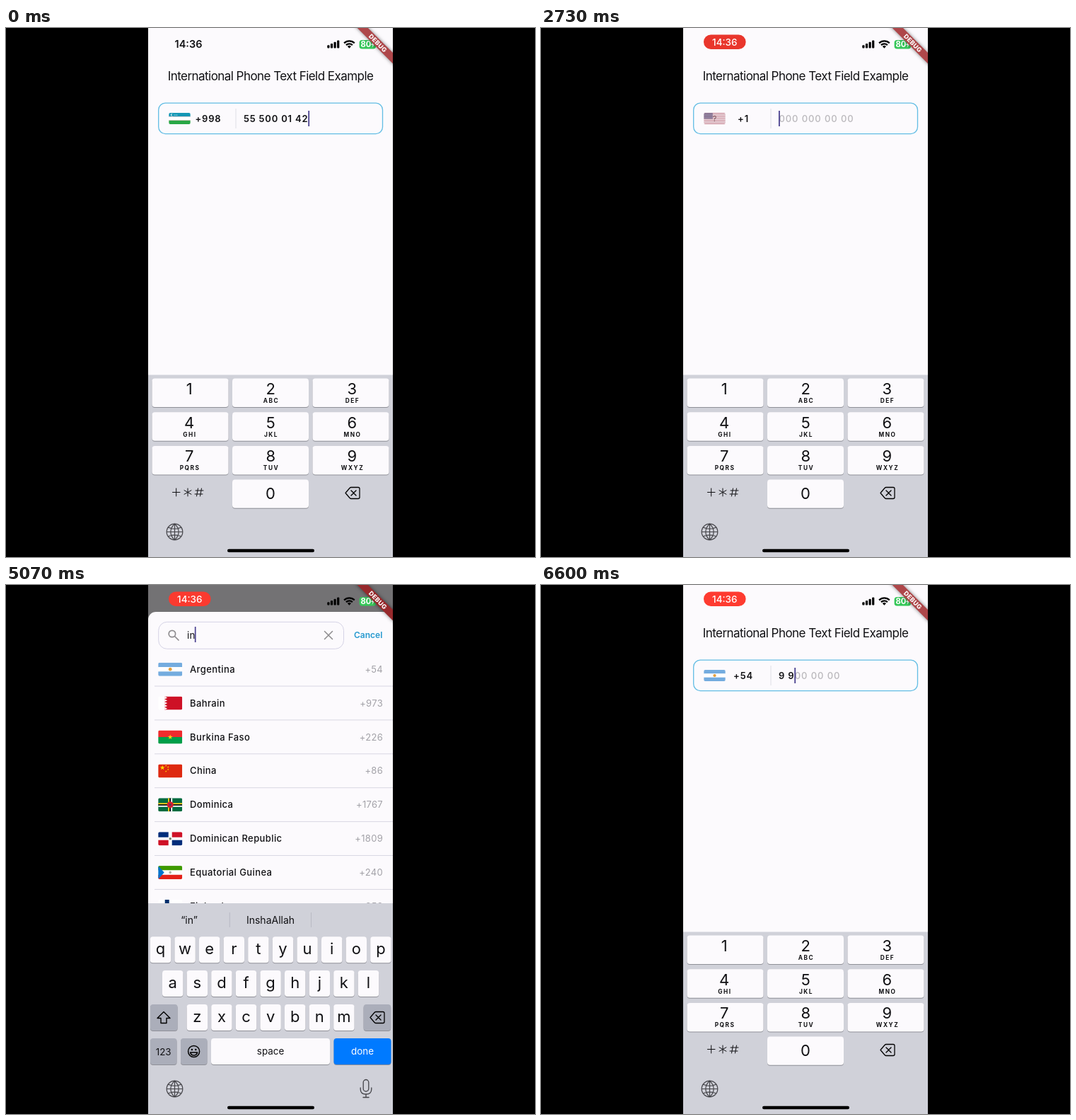
An HTML page with a canvas for the animation above (6.63 s loop, 748 by 748 pixels).

```html
<!DOCTYPE html>
<html lang="en">
<head>
<meta charset="utf-8">
<title>Phone field</title>
<style>
html, body { margin: 0; width: 100%; height: 100%; overflow: hidden; background: #000 }
canvas { display: block; width: 748px; height: 748px }
</style>
</head>
<body>
<canvas id="stage" width="748" height="748"></canvas>
<script>
const g = document.getElementById('stage').getContext('2d');
const LOOP = 6630, PAPER = '#fcfafd', BOARD = '#d0d1d9', INK = '#111114', GREY = '#a3a2a8', HINT = '#bab8bc', CARET = '#4b4290';
const ROW = 47.9;

const clamp = v => Math.max(0, Math.min(1, v));
const ease = (t, a, b) => { const p = clamp((t - a) / (b - a)); return 1 - (1 - p) ** 3; };
const count = (t, start, step, max) => Math.max(0, Math.min(max, Math.floor((t - start) / step)));

// Drawing helpers
function text(s, x, y, size, { w = 400, c = INK, a = 'left', ls = 0 } = {}) {
  g.font = `${w} ${size}px Inter, "Liberation Sans", sans-serif`;
  g.letterSpacing = ls + 'px';
  g.textAlign = a;
  g.fillStyle = c;
  g.fillText(s, x, y);
  return g.measureText(s).width;
}
function rect(x, y, w, h, c) { g.fillStyle = c; g.fillRect(x, y, w, h); }
function path(x, y, w, h, r) { g.beginPath(); g.roundRect(x, y, w, h, r); }
function round(x, y, w, h, r, c) { path(x, y, w, h, r); g.fillStyle = c; g.fill(); }
function disc(x, y, r, c) { g.beginPath(); g.arc(x, y, r, 0, 7); g.fillStyle = c; g.fill(); }
function poly(c, ...p) {
  g.beginPath();
  for (let i = 0; i < p.length; i += 2) g.lineTo(p[i], p[i + 1]);
  g.fillStyle = c; g.fill();
}
function stroke(d, c, w) {
  g.strokeStyle = c; g.lineWidth = w; g.lineCap = g.lineJoin = 'round';
  g.stroke(new Path2D(d));
}
function star(x, y, r, c) {
  const p = [];
  for (let i = 0; i < 10; i++) {
    const k = i % 2 ? r * .4 : r, a = i * Math.PI / 5;
    p.push(x + k * Math.sin(a), y - k * Math.cos(a));
  }
  poly(c, ...p);
}
function at(dx, dy, fn) { g.save(); g.translate(dx, dy); fn(); g.restore(); }

// Flags live on a 34 x 19 grid: stripe direction, stripe colours, details
const flags = {
  AF: ['v', '#111 #c8102e #0a7d43'],
  DZ: ['v', '#0a7d43 #fff', () => { disc(17, 9.5, 4, '#d21034'); disc(18.3, 9.5, 3.2, '#fff'); }],
  AR: ['h', '#74acdf #fff #74acdf', () => disc(17, 9.5, 2.4, '#e5a03c')],
  AM: ['h', '#d90012 #0033a0 #f2a800'],
  AT: ['h', '#ed2939 #fff #ed2939'],
  AZ: ['h', '#00a3dd #e4002b #509e2f', () => disc(17, 9.5, 2, '#fff')],
  BH: ['h', '#fff', () => {
    rect(9, 0, 25, 19, '#ce1126');
    for (let i = 0; i < 5; i++) poly('#fff', 9, i * 3.8, 13, i * 3.8 + 1.9, 9, i * 3.8 + 3.8);
  }],
  BY: ['h', '#c8313e #c8313e #4aa657', () => {
    rect(0, 0, 4, 19, '#f3dfe0');
    for (let i = 0; i < 5; i++) star(2, 2 + i * 3.8, 1.7, '#c8313e');
  }],
  BE: ['v', '#111 #fdda24 #ef3340'],
  BM: ['h', '#cf142b', () => {
    rect(0, 0, 17, 10, '#1b2f70');
    stroke('M0 0L17 10M17 0L0 10', '#fff', 2);
    stroke('M8.5 0V10M0 5H17', '#fff', 3);
    stroke('M8.5 0V10M0 5H17', '#cf142b', 1.5);
    rect(22, 5, 7, 8.5, '#fff'); rect(22, 11, 7, 2.5, '#3c8b4b'); disc(25.5, 8.5, 1.7, '#b24a4a');
  }],
  BT: ['h', '#ffd520', () => {
    poly('#ff5b1f', 0, 19, 34, 0, 34, 19);
    stroke('M8 15L13 14L13 11L18 12L19 8L23 8L24 4L28 3M16 14L20 11M23 10L27 7', '#fff', 2.2);
  }],
  BR: ['h', '#229e45', () => {
    poly('#f8e509', 3, 9.5, 17, 1.5, 31, 9.5, 17, 17.5);
    disc(17, 9.5, 4.4, '#2b49a3'); stroke('M13 8.5Q17 8 21 11', '#fff', .8);
  }],
  BG: ['h', '#fff #00966e #d62612'],
  BF: ['h', '#ef2b2d #009e49', () => star(17, 9.5, 3.6, '#fcd116')],
  CN: ['h', '#de2910', () => {
    star(6, 5, 3.6, '#ffde00');
    [[11, 2], [14, 4], [14, 7.5], [11, 10]].forEach(([x, y]) => star(x, y, 1.4, '#ffde00'));
  }],
  DM: ['h', '#006b3f', () => {
    ['#fcd116', '#111', '#fff'].forEach((c, i) => {
      rect(0, 7 + i * 1.8, 34, 1.8, c); rect(14 + i * 2, 0, 2, 19, c);
    });
    disc(17, 9.5, 4.6, '#d41c30'); disc(17, 9.5, 1.7, '#5d3b54');
  }],
  DO: ['h', '#fff', () => {
    rect(0, 0, 14.5, 7.5, '#002d7a'); rect(19.5, 0, 15, 7.5, '#ce1126');
    rect(0, 11.5, 14.5, 8, '#ce1126'); rect(19.5, 11.5, 15, 8, '#002d7a');
    disc(17, 9.5, 1.8, '#74806b');
  }],
  GQ: ['h', '#3e9a00 #fff #e32118', () => {
    poly('#0073ce', 0, 0, 8.5, 9.5, 0, 19); disc(17, 9.3, 1.8, '#aab5a5');
  }],
  FI: ['h', '#fff', () => { rect(9.5, 0, 6, 19, '#002f6c'); rect(0, 6.8, 34, 5.4, '#002f6c'); }],
  UZ: ['h', '#1397b5 #fff #28a745', () => {
    stroke('M0 6.4H34M0 12.6H34', '#e08a98', .4);
    disc(5, 3.3, 2, '#fff'); disc(5.9, 3.3, 1.7, '#1397b5');
    for (let i = 0; i < 3; i++) disc(9 + i * 2, 3.5, .6, '#fff');
  }],
  US: ['h', '#b22f44 #fff #b22f44 #fff #b22f44 #fff #b22f44 #fff #b22f44 #fff #b22f44 #fff #b22f44', () => {
    rect(0, 0, 14, 10.2, '#3c3b6e');
    for (let i = 0; i < 15; i++) disc(2 + i % 5 * 2.5, 2 + Math.floor(i / 5) * 3, .5, '#c9c9dd');
  }]
};
function flag(id, x, y, w, h) {
  const [dir, colors, detail] = flags[id], list = colors.split(' '), n = list.length;
  g.save();
  path(x, y, w, h, 2); g.clip();
  g.translate(x, y); g.scale(w / 34, h / 19);
  list.forEach((c, i) => dir === 'h' ? rect(0, i * 19 / n, 34, 19 / n + .1, c) : rect(i * 34 / n, 0, 34 / n + .1, 19, c));
  if (detail) detail();
  g.restore();
}

const countries = `AF Afghanistan 93,DZ Algeria 213,AR Argentina 54,AM Armenia 374,AT Austria 43,AZ Azerbaijan 994,BH Bahrain 973,
BY Belarus 375,BE Belgium 32,BM Bermuda 1441,BT Bhutan 975,BR Brazil 55,BG Bulgaria 359,BF Burkina Faso 226,CN China 86,
DM Dominica 1767,DO Dominican Republic 1809,GQ Equatorial Guinea 240,FI Finland 358`
  .split(',').map(s => s.trim().match(/^(\w+) (.+) (\d+)$/).slice(1));

// Splits a mask into the typed part and the remaining hint
function fill(mask, digits) {
  let i = 0, out = '';
  while (i < digits.length) {
    const m = mask[out.length];
    out += m === '0' ? digits[i++] : m;
  }
  return [out, mask.slice(out.length)];
}

function fieldState(t) {
  if (t < 700) return { code: '998', mask: '00 000 00 00', digits: '555000142'.slice(0, 9 - count(t, 0, 66, 9)) };
  if (t < 2660) return { code: t < 780 ? '998' : t < 890 ? '99' : t < 1150 ? '9' : '', inCode: true };
  if (t < 5600) {
    const n = count(t, 2760, 62, 10) - count(t, 3430, 57, 10);
    return { code: '1', mask: '000 000 00 00', digits: '5550201364'.slice(0, n) };
  }
  return { code: '54', mask: '0 000 00 00', digits: '99'.slice(0, count(t, 6180, 170, 2)) };
}

function drawForm(t) {
  text('International Phone Text Field Example', 374, 73.8, 17, { a: 'center', ls: -.54 });
  path(215.7, 106.2, 316.8, 43.4, 9.5);
  g.strokeStyle = '#62bde4'; g.lineWidth = 1.3; g.stroke();
  rect(324.5, 114, 1, 28, '#dedde6');

  const s = fieldState(t);
  const [id, shown] = t < 2000 ? ['UZ', 1 - clamp((t - 780) / 120)] : t < 5600 ? ['US', clamp((t - 2660) / 140)] : ['AR', 1];
  if (shown < 1) {
    round(230.5, 120, 30, 16, 2, '#e4e2e7');
    text('?', 245.5, 132, 11, { a: 'center' });
  }
  g.globalAlpha = shown;
  if (shown) flag(id, 230.2, 120, 30.6, 16);
  g.globalAlpha = 1;

  const style = { w: 600, ls: .8 };
  const codeWidth = text('+' + s.code, 286, 133.3, 13, { ...style, a: 'center' });
  if (s.inCode) {
    text('Your phone number', 336, 133.5, 13, { w: 500, c: HINT, ls: .4 });
    rect(285.6 + codeWidth / 2 - .8, 117, 1.8, 22, INK);
  } else {
    const [typed, rest] = fill(s.mask, s.digits);
    const end = 336 + text(typed, 336, 133.3, 13, style);
    text(rest, end + .5, 133.3, 13, { w: 500, ls: .9, c: HINT });
    rect(end, 117, 1.8, 22, CARET);
  }
}

function key(x, y, w, h, c = PAPER) {
  round(x, y + 1, w, h, 4, '#8f9097');
  round(x, y, w, h, 4, c);
}
function backspace(x, y, pressed) {
  at(x, y, () => {
    const d = 'M-10 0L-4 -7Q-3 -8 -2 -8H8Q10 -8 10 -6V6Q10 8 8 8H-2Q-3 8 -4 7Z';
    if (pressed) { g.fillStyle = '#000'; g.fill(new Path2D(d)); }
    stroke(d, '#000', 1.3);
    stroke('M-2 -3.5L5 3.5M5 -3.5L-2 3.5', pressed ? '#fff' : '#000', 1.4);
  });
}
function globe() {
  at(238.5, 712.5, () => {
    stroke('M-11.3 0A11.3 11.3 0 1 0 11.3 0A11.3 11.3 0 1 0 -11.3 0H11.3M0 -11.3V11.3' +
      'M0 -11.3C-7.5 -5 -7.5 5 0 11.3M0 -11.3C7.5 -5 7.5 5 0 11.3M-9 -6.2Q0 -2.6 9 -6.2M-9 6.2Q0 2.6 9 6.2', '#444449', 1.2);
  });
}

function drawDigits(t) {
  rect(201, 490.5, 346, 258, BOARD);
  ['', 'ABC', 'DEF', 'GHI', 'JKL', 'MNO', 'PQRS', 'TUV', 'WXYZ'].forEach((label, i) => {
    const col = i % 3, y = 495.5 + Math.floor(i / 3) * 47.7;
    const mid = 374.2 + (col - 1) * 115;
    key(206.5 + col * 113.5, y, 108, 40.6);
    text(i + 1, mid, y + 22.4, 22, { a: 'center' });
    text(label, mid + .8, y + 34.5, 8.3, { w: 700, a: 'center', ls: 1.5 });
  });
  key(320, 638.5, 108, 40.3);
  text('0', 374, 666, 22, { a: 'center' });
  stroke('M235.5 656.5H246M240.7 651V662M257 651V662M252 653.7L262 659.3M262 653.7L252 659.3' +
    'M268 654H279M267 659H278M271.5 651L269.5 662M276.5 651L274.5 662', INK, 1);
  backspace(490, 657.5, t > 50 && t < 690 || t > 740 && t < 895 || t > 3430 && t < 4010);
  globe();
}

function drawLetters(query) {
  rect(201, 450, 346, 298, BOARD);
  const words = { '': ['I', 'The', 'I’m'], i: ['“i”', 'I', 'in'], in: ['“in”', 'InshaAllah', ''] }[query];
  words.forEach((w, i) => text(w, 259 + i * 115, 478.5, 14, { a: 'center' }));
  rect(315.8, 463, 1, 21, '#b9bac4'); rect(431, 463, 1, 21, '#b9bac4');
  [['qwertyuiop', 203.8], ['asdfghjkl', 221], ['zxcvbnm', 255.6]].forEach(([row, x0], r) => {
    [...row].forEach((ch, i) => {
      const x = x0 + i * 34.6, y = 497.3 + r * 47.8;
      key(x, y, 29.4, 37);
      text(ch, x + 14.7, y + 24.7, 22, { a: 'center' });
    });
  });
  const dark = '#abaeba';
  key(204, 593, 38.6, 37, dark); key(505.6, 593, 38.6, 37, dark);
  key(204, 641, 37.5, 37, dark); key(247, 641, 37.5, 37, dark);
  key(290, 641, 168, 37); key(463.5, 641, 81, 37, '#007aff');
  stroke('M223 603.5L232 612.5H227V619.5H219V612.5H214Z', '#000', 1.4);
  backspace(525, 611.5);
  text('123', 222.7, 664.5, 13.4, { a: 'center' });
  text('space', 374, 663.5, 13.4, { a: 'center' });
  text('done', 504, 663.5, 13.4, { a: 'center', c: '#fff' });
  at(265.6, 659.5, () => {
    stroke('M-8 0A8 8 0 1 0 8 0A8 8 0 1 0 -8 0M-5 1.5H5Q4 5.5 0 5.5T-5 1.5', '#000', 1.5);
    disc(-2.7, -2.5, 1.2, '#000'); disc(2.7, -2.5, 1.2, '#000');
  });
  globe();
  at(509, 712, () => {
    path(-3.8, -12.5, 7.6, 16.5, 3.8); g.strokeStyle = '#444449'; g.lineWidth = 1.3; g.stroke();
    stroke('M-7.8 -1V1Q-7.8 8 0 8T7.8 1V-1M0 8V12.5M-4 12.5H4', '#444449', 1.3);
  });
}

function drawSheet(t, query) {
  round(201, 38, 346, 720, [11, 11, 0, 0], PAPER);
  path(215.7, 52.3, 261.8, 38, 12);
  g.strokeStyle = '#d5d3e6'; g.lineWidth = 1; g.stroke();
  stroke('M230.2 69A4.7 4.7 0 1 0 239.6 69A4.7 4.7 0 1 0 230.2 69M238.5 72.5L244 78', '#8d8b8e', 1.7);
  const w = query ? text(query, 256, 75.5, 13.5, { ls: .2 }) : 0;
  if (query) stroke('M450.5 65.5L461.5 76.5M461.5 65.5L450.5 76.5', '#8d8b8e', 1.5);
  else text('Search', 256, 75.5, 13, { c: HINT, ls: .3 });
  rect(255.2 + w, 59, 1.7, 22, CARET);
  text('Cancel', 492, 75.3, 12, { w: 600, c: '#2699cf' });

  g.save();
  g.beginPath(); g.rect(201, 105, 346, 643); g.clip();
  const scroll = query ? 0 : (7 * ROW - 23) * ease(t, 4310, 4600);
  countries.filter(c => c[1].toLowerCase().includes(query)).forEach(([id, name, code], i) => {
    const y = 119 + i * ROW - scroll;
    if (y < 60 || y > 770) return;
    flag(id, 215.2, y - 9.3, 34, 19);
    text(name, 260, y + 4.7, 13, { w: 500, ls: .4 });
    text('+' + code, 533, y + 4.7, 13, { a: 'right', c: GREY, ls: .3 });
    rect(210, y + 23.5, 337, 1, '#d9d8e3');
  });
  g.restore();
}

function drawStatus(t, dim) {
  if (t < 400) text('14:36', 258, 28.3, 14.5, { w: 600, a: 'center' });
  else {
    const pulse = .07 - .07 * Math.cos(2 * Math.PI * ((t - 3730) / 740 + .06));
    round(230, 9.6, 59.6, 20.4, 10.2, '#ff3b30');
    round(230, 9.6, 59.6, 20.4, 10.2, `rgba(0,0,0,${pulse})`);
    if (t < 1700) {
      stroke('M253.5 20A6.3 6.3 0 1 0 266.1 20A6.3 6.3 0 1 0 253.5 20', '#fff', 1.4);
      disc(259.8, 20, 3, '#fff');
    } else text('14:36', 259.8, 24.8, 13.5, { w: 500, a: 'center', c: '#fff' });
  }
  for (let i = 0; i < 4; i++) round(454.3 + i * 4.6, 24.2 - i * 2.2, 3.2, 4.2 + i * 2.2, 1, '#000');
  g.lineCap = 'butt'; g.strokeStyle = '#000';
  for (const r of [10.3, 6.3]) {
    g.lineWidth = 2.3; g.beginPath(); g.arc(485.4, 28.6, r, -2.36, -.78); g.stroke();
  }
  poly('#000', 485.4, 28.8, 482.7, 25.8, 485.4, 24.8, 488.1, 25.8);
  round(499.6, 17, 23.5, 12.6, 3.8, '#36c759');
  text('80', 501.5, 27.3, 11.2, { w: 700, c: '#fff' });
  poly('#fff', 519.5, 19, 516.2, 24, 518.5, 24, 517.6, 28, 521, 22.7, 518.7, 22.7);

  g.save();
  g.translate(547, 0); g.rotate(Math.PI / 4);
  g.shadowColor = 'rgba(0,0,0,.5)'; g.shadowBlur = 5;
  rect(-45, 24.8, 90, 10.7, dim > .5 ? '#97292c' : '#ae474a');
  g.shadowBlur = 0; g.shadowColor = 'transparent';
  text('DEBUG', .2, 33.3, 8.8, { w: 800, a: 'center', c: '#fff', ls: .3 });
  g.restore();
}

function draw(t) {
  rect(0, 0, 748, 748, '#000');
  g.save();
  g.beginPath(); g.rect(201, 0, 346, 748); g.clip();
  rect(201, 0, 346, 748, PAPER);
  drawForm(t);

  const open = ease(t, 4090, 4330) - ease(t, 5700, 5950);
  const digits = 1 - ease(t, 4090, 4300) + ease(t, 5960, 6170);
  const letters = ease(t, 4360, 4580) - ease(t, 5680, 5900);
  const query = t < 4880 ? '' : t < 5060 ? 'i' : 'in';
  if (digits > 0) at(0, 258 * (1 - digits), () => drawDigits(t));
  if (open > 0) {
    rect(201, 0, 346, 748, `rgba(0,0,0,${.54 * open})`);
    at(0, 710 * (1 - open), () => drawSheet(t, query));
  }
  if (letters > 0) at(0, 298 * (1 - letters), () => drawLetters(query));
  round(313, 736.8, 123, 4.4, 2.2, '#000');
  drawStatus(t, open);
  g.restore();
}

const start = performance.now();
function tick() {
  draw((performance.now() - start) % LOOP);
  requestAnimationFrame(tick);
}
tick();
</script>
</body>
</html>
```
